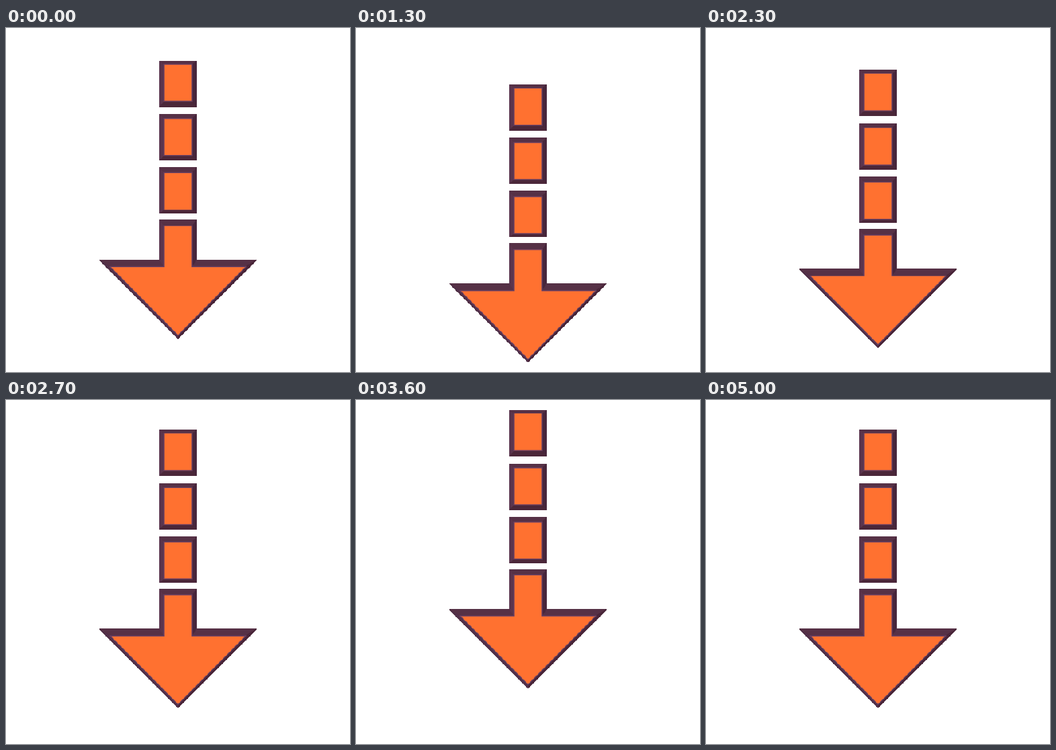
These frames come from a looping animation (512 px wide and 512 px high, 5100 ms). An HTML page with a canvas:

```html
<!DOCTYPE html>
<html>
<head>
<meta charset="utf-8">
<style>
html, body { margin: 0; width: 100%; height: 100%; overflow: hidden; background: #fff; }
canvas { display: block; width: 512px; height: 512px; }
</style>
</head>
<body>
<canvas id="stage" width="512" height="512"></canvas>
<script>
const SIZE = 600, BEVEL = 9.3, ZOOM = 0.018, EYE = [300, 209];
const stage = document.getElementById('stage').getContext('2d');
stage.imageSmoothingEnabled = false;
const art = document.createElement('canvas');
art.width = art.height = SIZE;
const ctx = art.getContext('2d');

const block = y => [[267, y], [333, y], [333, y + 81], [267, y + 81]];
const shapes = [
  block(57), block(150), block(243),
  [[267, 334], [333, 334], [333, 404], [437, 404], [437, 406],
   [300, 542.5], [163, 406], [163, 404], [267, 404]]
];
const ends = [[437, 404], [300, 542.5], [163, 404]];
const core = shapes.map((s, i) => i < 3 ? s : [...s.slice(0, 3), ...ends, s[8]]);

function normal(a, b) {
  const dx = b[0] - a[0], dy = b[1] - a[1], len = Math.hypot(dx, dy);
  return [dy / len, -dx / len];
}

// Mitred inset of a clockwise polygon
function inset(points, d) {
  const n = points.length;
  return points.map((p, i) => {
    const a = normal(points[(i + n - 1) % n], p);
    const b = normal(p, points[(i + 1) % n]);
    const k = d / (1 + a[0] * b[0] + a[1] * b[1]);
    return [p[0] - (a[0] + b[0]) * k, p[1] - (a[1] + b[1]) * k];
  });
}

function trace(points) {
  ctx.beginPath();
  points.forEach(p => ctx.lineTo(p[0], p[1]));
  ctx.closePath();
}

function faceColor([x, y]) {
  if (y < -0.9) return '#563146';
  if (y > 0.9) return '#4b2739';
  if (y > 0.1) return x > 0 ? '#482539' : '#51304a';
  return x > 0 ? '#47263b' : '#5a354d';
}

const fronts = core.map(s => inset(s, BEVEL));
const shift = (points, dy) => points.map(([x, y]) => [x, y + dy]);
const project = points => points.map(p => p.map((v, i) => v + ZOOM * (v - EYE[i])));

function drawShape(i, dy) {
  const outer = shift(core[i], dy), front = project(shift(fronts[i], dy));
  ctx.save();
  trace(shift(shapes[i], dy));
  ctx.clip();
  ctx.fillStyle = '#4b2739';
  ctx.fill();
  outer.forEach((a, j) => {
    const next = (j + 1) % outer.length, b = outer[next];
    trace([a, b, front[next], front[j]]);
    ctx.fillStyle = ctx.strokeStyle = faceColor(normal(a, b));
    ctx.lineWidth = 0.5;
    ctx.fill();
    ctx.stroke();
  });
  trace(front);
  ctx.strokeStyle = '#6b4061';
  ctx.lineWidth = 3;
  ctx.stroke();
  ctx.fillStyle = '#ff7130';
  ctx.fill();
  ctx.restore();
}

function draw(time) {
  // Twelve steps per quarter wave, with a short hold at the start and both extremes
  const tick = Math.floor(time / 100) % 51;
  const step = tick - (tick > 0) - (tick > 13) - (tick > 38);
  const dy = Math.round(40.8 * Math.sin(step * Math.PI / 24));
  ctx.fillStyle = '#fff';
  ctx.fillRect(0, 0, SIZE, SIZE);
  shapes.forEach((_, i) => drawShape(i, dy));
  stage.drawImage(art, 0, 0, 512, 512);
  requestAnimationFrame(draw);
}
draw(0);
</script>
</body>
</html>
```
